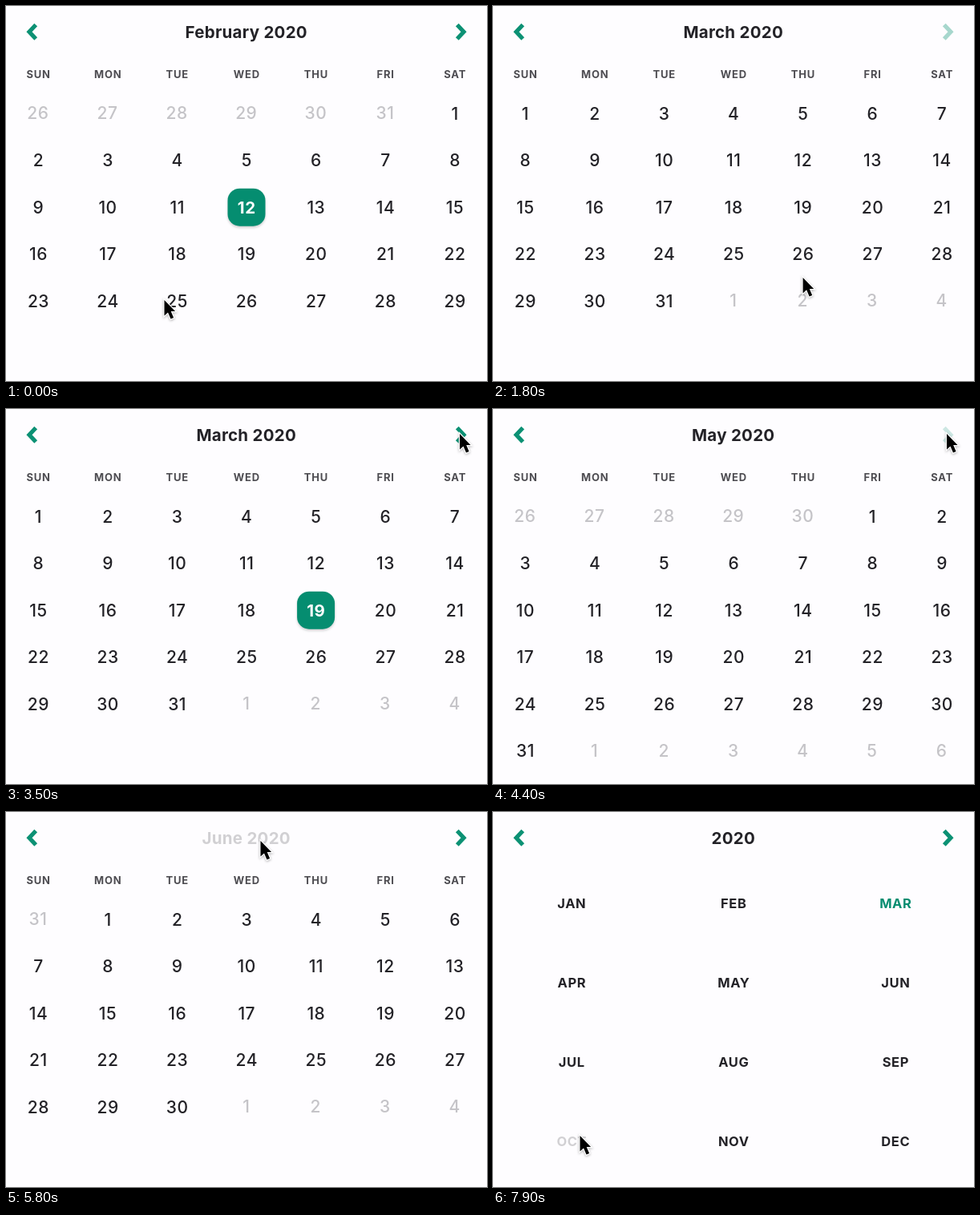
An HTML page that plays this animation: 600x468 px, repeating every 8000 ms.

```html
<!DOCTYPE html>
<html lang="en">
<head>
<meta charset="utf-8">
<title>Calendar</title>
<style>
html, body { margin: 0; width: 100%; height: 100%; overflow: hidden; background: #fefdff; }
svg { display: block; width: 100vw; height: 100vh; font-family: Inter, "Open Sans", sans-serif; }
text { text-anchor: middle; }
.pill { filter: drop-shadow(0 2px 1.5px rgba(0, 0, 0, .18)); }
.cursor { filter: drop-shadow(0 1.5px 1.5px rgba(0, 0, 0, .3)); }
</style>
</head>
<body>
<svg id="stage" viewBox="0 0 600 468"></svg>
<script>
const LOOP = 8000, STEP = 100, YEAR = 2020;
const INK = '#232227', GREEN = '#058d70', FADED = '#c5c4c8';

const spot = (x, y) => ({ x, y });
const dayAt = (col, row) => spot(40.2 + col * 86.6, 134.2 + row * 58.5);
const monthAt = i => spot(98 + i % 3 * 202, 114.5 + Math.floor(i / 3) * 98.7);

const clamp = v => Math.max(0, Math.min(1, v));
const smooth = v => (v = clamp(v), v * v * (3 - 2 * v));
const press = (t, from) => 1 - .8 * clamp((t - from) / 200);
const release = (t, from) => .2 + .8 * smooth((t - from) / 350);

const HOME = spot(197.5, 367), NEXT = spot(566, 31), TITLE = spot(317.5, 36);
const AWAY = spot(900, -72);

// Cursor moves: start, duration, goal
const MOVES = [
  [400, 500, AWAY], [900, 200, NEXT], [1300, 500, dayAt(4, 3.5)],
  [1800, 500, dayAt(4, 2)], [2650, 300, AWAY], [2950, 350, NEXT],
  [4850, 450, TITLE], [6400, 1000, spot(108.5, 404)]
];
const FLIPS = [1700, 3800, 4400, 4800];
const OVERVIEW = 6000;

const name = (month, style) => new Date(YEAR, month, 1).toLocaleString('en-US', { month: style });
const weekday = i => new Date(YEAR, 1, 2 + i).toLocaleString('en-US', { weekday: 'short' }).toUpperCase();

function label(str, { x, y }, size, weight, fill, gap, opacity = 1) {
  return `<text x="${x + gap / 2}" y="${y + size * .3636}" font-size="${size}" ` +
    `font-weight="${weight}" fill="${fill}" letter-spacing="${gap}" opacity="${opacity}">${str}</text>`;
}

function chevron(side, opacity) {
  return `<path d="M-262.8 -8.8 -271 0 -262.8 8.8" transform="translate(300 32.3) scale(${side} 1)" ` +
    `fill="none" stroke="#0c9174" stroke-width="5.2" opacity="${opacity}"/>`;
}

function pill(day, at, opacity) {
  return `<rect class="pill" x="${at.x - 23.5}" y="${at.y - 23.5}" width="47" height="47" rx="15" ` +
    `fill="${GREEN}" opacity="${opacity}"/>` + label(day, at, 20.5, 700, '#fff', .5);
}

function picked(t, month) {
  if (month === 1) return t < 300 ? { day: 12, since: -LOOP } : { day: 25, since: 300 };
  return month === 2 && t >= 2500 ? { day: 19, since: 2500 } : {};
}

function monthView(t, month) {
  const lead = new Date(YEAR, month, 1).getDay();
  const count = new Date(YEAR, month + 1, 0).getDate();
  const pick = picked(t, month);
  let out = '';
  for (let i = 0; i < 7; i++)
    out += label(weekday(i), spot(dayAt(i, 0).x, 85.2), 13, 700, '#4d4c51', .8);
  for (let i = 0; i < Math.ceil((lead + count) / 7) * 7; i++) {
    const at = dayAt(i % 7, Math.floor(i / 7)), day = i - lead + 1;
    if (day === pick.day) out += pill(day, at, release(t, pick.since));
    else if (day > 0 && day <= count) out += label(day, at, 21, 500, INK, .5);
    else out += label(new Date(YEAR, month, day).getDate(), spot(at.x - .5, at.y - .7), 21, 500, FADED, .5);
  }
  return out;
}

function yearView(t) {
  let out = '';
  for (let i = 0; i < 12; i++)
    out += label(name(i, 'short').toUpperCase(), monthAt(i), 16.5, 700,
      i === 2 ? GREEN : INK, .6, i === 9 ? press(t, 7400) : 1);
  return out;
}

function cursor(t) {
  let { x, y } = HOME;
  for (const [from, span, goal] of MOVES) {
    const k = smooth((t - from) / span);
    x += (goal.x - x) * k;
    y += (goal.y - y) * k;
  }
  return `<path class="cursor" transform="translate(${x} ${y})" d="M0 0V19.5L4.5 15.4 8 23.6 11.6 22 8.2 14H13.6Z" ` +
    `stroke="#fff" stroke-width="2.4" paint-order="stroke"/>`;
}

function render(t) {
  const flips = FLIPS.filter(f => f <= t), month = 1 + flips.length;
  const next = flips.length ? release(t, flips.pop()) : press(t, 1200);
  const yearly = t >= OVERVIEW;
  const title = yearly ? YEAR : `${name(month, 'long')} ${YEAR}`;
  const glow = yearly ? release(t, OVERVIEW - 100) : press(t, 5600);
  stage.innerHTML = chevron(1, 1) + chevron(-1, next) +
    label(title, spot(299.6, 32.4), 20.5, 700, INK, .27, glow) +
    (yearly ? yearView(t) : monthView(t, month)) + cursor(t);
}

const start = performance.now();
let shown = -1;
function tick() {
  const t = Math.floor((performance.now() - start) % LOOP / STEP) * STEP;
  if (t !== shown) render(shown = t);
  requestAnimationFrame(tick);
}
tick();
</script>
</body>
</html>
```
